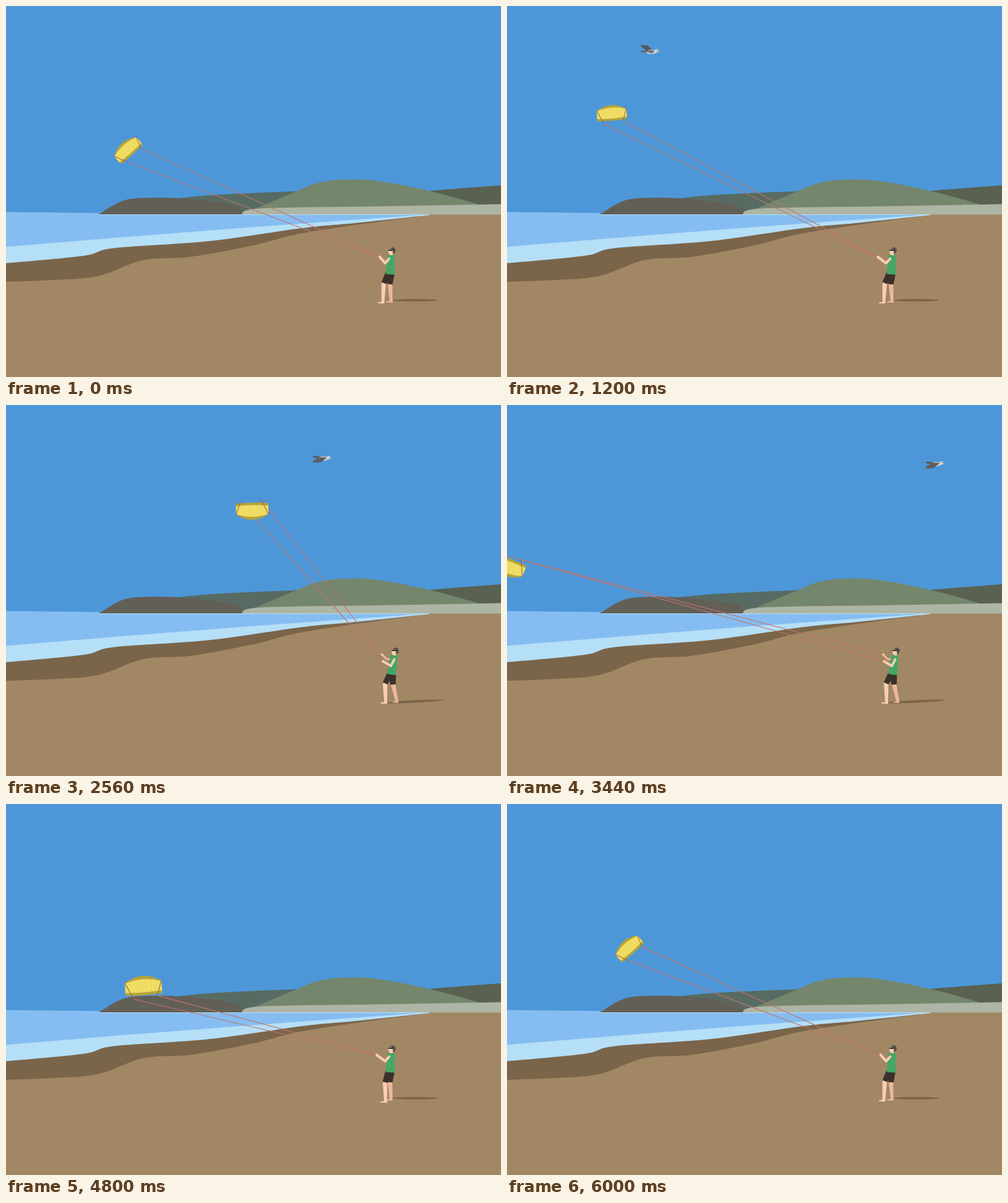
Write an HTML page with a canvas that moves like this. It is 800 px wide and 600 px high and loops after 6040 ms.

```html
<!DOCTYPE html>
<html lang="en">
<head>
<meta charset="utf-8">
<title>Kite on the beach</title>
<style>
html, body { margin: 0; width: 100%; height: 100%; overflow: hidden; background: #4d97d9; }
canvas { display: block; }
</style>
</head>
<body>
<canvas id="stage" width="800" height="600"></canvas>
<script>
const ctx = document.getElementById('stage').getContext('2d');
const LOOP = 6040, STEP = 40;

// a few points on the flight: time, x, y, heading in degrees, scale
const flight = [
  [0, 196.5, 232, -41, 0.98],
  [640, 191, 218.5, -26, 1],
  [1320, 170, 158, 5, 1],
  [1760, 198.5, 77.5, 63, 1.05],
  [2080, 270, 41, 100, 1.05],
  [2560, 398, 170.5, 179, 1.08],
  [2980, 233, 262, 250, 1.08],
  [3440, 2, 261.5, 201, 1.12],
  [3860, 72, 332, 100, 1.15],
  [4400, 198, 325, 32, 1.22],
  [4800, 222, 295, -4, 1.23],
  [5400, 203, 242, -31, 1.05]
];

// smooth periodic path through the keys
function sample(keys, t) {
  const n = keys.length;
  let i = n - 1;
  while (keys[i][0] > t) i--;
  const key = k => keys[(k + n) % n];
  const time = k => key(k)[0] + Math.floor(k / n) * LOOP;
  const slope = (k, c) => (key(k + 1)[c] - key(k)[c]) / (time(k + 1) - time(k));
  const tangent = (k, c) => {
    const before = time(k) - time(k - 1), after = time(k + 1) - time(k);
    return (slope(k - 1, c) * after + slope(k, c) * before) / (before + after);
  };
  const span = time(i + 1) - time(i), u = (t - time(i)) / span;
  const a = u * u * (3 - 2 * u);
  return key(i).slice(1).map((v, j) => {
    const c = j + 1;
    return v * (1 - a) + key(i + 1)[c] * a +
      span * u * (1 - u) * ((1 - u) * tangent(i, c) - u * tangent(i + 1, c));
  });
}

function ease(t, from, to) {
  const u = Math.min(1, Math.max(0, (t - from) / (to - from)));
  return u * u * (3 - 2 * u);
}

function poly(color, p) {
  ctx.fillStyle = color;
  ctx.beginPath();
  for (let i = 0; i < p.length; i += 2) ctx.lineTo(p[i], p[i + 1]);
  ctx.fill();
}

// smooth edge through the points, closed along a level base
function hill(color, base, p) {
  const n = p.length / 2;
  const at = i => {
    const k = Math.min(n - 1, Math.max(0, i)) * 2;
    return [p[k], p[k + 1]];
  };
  ctx.fillStyle = color;
  ctx.beginPath();
  ctx.moveTo(p[0], base);
  ctx.lineTo(p[0], p[1]);
  for (let i = 0; i < n - 1; i++) {
    const [a, b, c, d] = [at(i - 1), at(i), at(i + 1), at(i + 2)];
    ctx.bezierCurveTo(
      b[0] + (c[0] - a[0]) / 6, b[1] + (c[1] - a[1]) / 6,
      c[0] - (d[0] - b[0]) / 6, c[1] - (d[1] - b[1]) / 6, c[0], c[1]);
  }
  ctx.lineTo(p[p.length - 2], base);
  ctx.fill();
}

function stroke(color, width, ...points) {
  ctx.strokeStyle = color;
  ctx.lineWidth = width;
  ctx.lineCap = ctx.lineJoin = 'round';
  ctx.beginPath();
  points.forEach(p => ctx.lineTo(p[0], p[1]));
  ctx.stroke();
}

function dot(color, x, y, rx, ry = rx, turn = 0) {
  ctx.fillStyle = color;
  ctx.beginPath();
  ctx.ellipse(x, y, rx, ry, turn, 0, 7);
  ctx.fill();
}

// tapered bar from a to b
function limb(color, a, wa, b, wb) {
  const dx = b[0] - a[0], dy = b[1] - a[1], d = 2 * Math.hypot(dx, dy);
  const nx = -dy / d, ny = dx / d;
  poly(color, [
    a[0] + nx * wa, a[1] + ny * wa, b[0] + nx * wb, b[1] + ny * wb,
    b[0] - nx * wb, b[1] - ny * wb, a[0] - nx * wa, a[1] - ny * wa]);
}

function drawLand() {
  const shore = 338;
  poly('#4d97d9', [0, 0, 800, 0, 800, 600, 0, 600]);
  hill('#596150', shore, [660, 301, 740, 294.5, 800, 290]);
  hill('#586b62', shore, [262, 313, 330, 306, 480, 299]);
  hill('#625f57', shore, [149, 338, 185, 316.5, 220, 310.5, 285, 311.5, 368, 322, 385, 338]);
  hill('#74866c', shore, [381, 337, 470, 299.5, 505, 286, 548, 280.8, 605, 283.5, 692, 301, 768, 322]);
  hill('#adb5a5', shore, [380, 338, 410, 327.5, 600, 324, 800, 320.5]);
  poly('#a28764', [0, 337.3, 800, 337.3, 800, 600, 0, 600]);
  hill('#7a654a', 337, [0, 446, 80, 443, 150, 436.5, 222, 411, 300, 405.5, 400, 387, 490, 365.5, 690, 337]);
  hill('#b5dff7', 337, [0, 416, 125, 404, 175, 391.5, 330, 380, 480, 359, 570, 350.5, 685, 338]);
  poly('#85bdf2', [0, 333.3, 151, 334.8, 149, shore, 670, shore, 400, 357.5, 200, 373, 0, 389.5]);
}

function drawBird(t) {
  const flown = t - 640;
  const lift = Math.cos(2 * Math.PI * (flown / 420 - 0.15));
  const far = -6 - 4 * lift, near = 3.5 - 3.5 * lift, bob = 1 + 1.3 * lift;
  ctx.save();
  ctx.translate(116 + 0.2057 * flown, 65 + 0.0103 * flown);
  poly('#55575a', [4, bob - 1, -4, far + 0.5, -16, far, -13, far + 3, -4, bob + 2]);
  dot('#bcc4c9', 2, bob + 2, 9, 3.6);
  poly('#5d5d5c', [7, bob, -5, bob, -16, near, -13, near + 2, -3, near + 1.5, 3, bob + 4]);
  dot('#d3dade', 11, bob, 3.3, 2.5);
  dot('#25282b', 12.3, bob - 0.4, 0.8);
  poly('#a9a58f', [13.5, bob - 1, 16, bob + 0.6, 13.5, bob + 1.4]);
  ctx.restore();
}

// sail cut from a top arch and a flatter trailing edge
function sail(color, side, top, bottom) {
  ctx.fillStyle = color;
  ctx.beginPath();
  ctx.moveTo(-24, side);
  ctx.quadraticCurveTo(0, top, 24, side);
  ctx.lineTo(24.4, bottom - 1);
  ctx.quadraticCurveTo(0, bottom + 1.5, -24.2, bottom - 0.5);
  ctx.fill();
}

function drawKite([x, y, angle, size], hands) {
  const r = angle * Math.PI / 180, cos = Math.cos(r), sin = Math.sin(r);
  const ends = [[-13.5, 16], [17.5, 13.2]];
  ends.forEach(([u, v], i) => {
    const knot = [x + size * (u * cos - v * sin), y + size * (u * sin + v * cos)];
    stroke('#c0746a', 1.2, knot, hands[i]);
  });
  ctx.save();
  ctx.translate(x, y);
  ctx.rotate(r);
  ctx.scale(size, size);
  sail('#b4a23b', -6, -22, 11.3);
  sail('#eedb5f', -5.4, -14, 7.6);
  for (let i = -18; i <= 18; i += 6) {
    stroke('#f3e47c', 0.8, [i, -8.5 + Math.abs(i) / 8], [i + 1, 7]);
  }
  ends.forEach((end, i) => stroke('#a7633c', 1, [i ? 24 : -24, -6], end));
  ctx.restore();
}

function drawMan(pose, step, hands) {
  const skin = '#f9cdb3', shade = '#edb79b', shorts = '#3b302b';
  // a joint and how far it shifts in the second stance
  const joint = (x, y, dx, dy = 2, k = pose) => [x + dx * k, y + dy * k];
  const front = (x, y, dx) => joint(x, y, dx, 2, step);

  dot('#7b6449', 661 - pose, 475.8 + 3.7 * pose, 37 + 11 * pose, 2, -0.05 * pose);

  const backKnee = joint(620.5, 450, 5), backAnkle = joint(622.5, 478, 9.5);
  const frontKnee = front(610.5, 448, 2.2), frontAnkle = front(609, 479.5, 4.6);
  limb(shade, backKnee, 7.5, backAnkle, 4.5);
  limb(shade, [backAnkle[0] + 2, backAnkle[1]], 3.5, joint(614.5, 478.5, 10.5), 1.5);
  limb(skin, frontKnee, 7.5, frontAnkle, 4.5);
  limb(skin, [frontAnkle[0] + 2.5, frontAnkle[1]], 3.5, front(601, 480, 4.2), 1.5);

  limb(shorts, joint(622, 432.5, 2.5), 12, backKnee, 8.5);
  limb(shorts, joint(618.5, 432.5, 3), 11, frontKnee, 8);

  stroke(shade, 3.2, joint(618, 409, 3), joint(612, 416, 3, -5), hands[0]);
  limb('#43a864', joint(622.5, 402.5, 4.7), 11, joint(620.8, 434, 2.5), 14.5);
  stroke(skin, 3.8, joint(619.5, 408.5, 8, 3), joint(613, 416, 9, 6), hands[1]);
  hands.forEach(h => dot(skin, h[0], h[1], 1.8));

  const [x, y] = joint(623, 396, 5);
  limb(skin, [x, y + 2], 5, [x, y + 7], 4.5);
  dot('#544e4b', x + 1.8, y - 0.5, 5, 5.2);
  dot(skin, x - 1.2, y + 1.8, 3.6, 4.5);
  stroke('#2e2b2c', 1.8, [x - 4, y - 1], [x + 2, y - 1]);
}

function draw(now) {
  const t = Math.floor((now % LOOP) / STEP) * STEP;
  const pose = ease(t, 1840, 2240) - ease(t, 3820, 4640);
  const step = ease(t, 1880, 2320) - ease(t, 4760, 5120);
  const pull = 5 * Math.abs(Math.sin(2 * Math.PI * t / LOOP));
  const hands = [
    [605 - pull + 5 * pose, 407.5 - 4 * pose],
    [604 - pull + 7.5 * pose, 405.5 + 9 * pose]
  ];
  drawLand();
  drawBird(t);
  drawKite(sample(flight, t), hands);
  drawMan(pose, step, hands);
}

let start;
function tick(now) {
  if (start === undefined) start = now;
  draw(now - start);
  requestAnimationFrame(tick);
}
draw(0);
requestAnimationFrame(tick);
</script>
</body>
</html>
```
